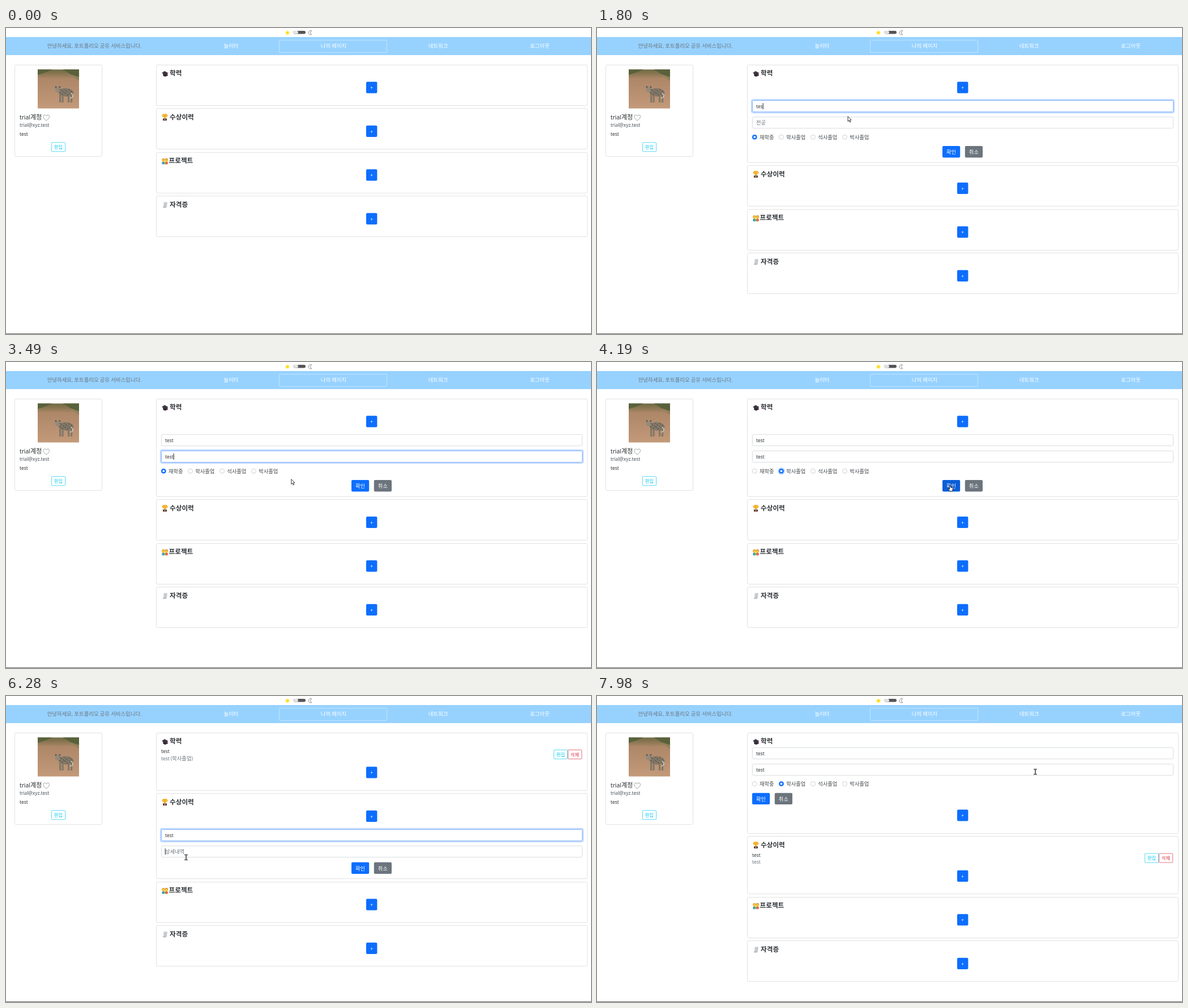
These frames come from a looping animation (1033 px wide and 542 px high, 8 s). An HTML page with a canvas:

```html
<!DOCTYPE html>
<html lang="ko">
<head>
<meta charset="utf-8">
<style>
html, body { margin: 0; width: 100%; height: 100%; overflow: hidden; background: #fff; }
canvas { display: block; }
</style>
</head>
<body>
<canvas id="stage" width="1033" height="542"></canvas>
<script>
const ctx = document.getElementById('stage').getContext('2d');
const FONT = '"Noto Sans", "Noto Sans CJK KR", "Noto Sans CJK JP", sans-serif';
const BLUE = '#0d6efd', DARK_BLUE = '#0b5ed7', GRAY = '#6c757d', INK = '#2c3034';
const CYAN = '#0dcaf0', RED = '#dc3545', GLOW = 'rgba(13,110,253,.25)';
const CARD_LINE = '#e2e2e2';
const LOOP = 8000, BODY = 8.3, SMALL = 7.3;

// [step, x, y]; one step is a tenth of a second
const CURSOR_PATH = [
  [2, 652, 9], [5, 645, 104], [8, 645, 104], [13, 440, 139], [16, 443, 141],
  [18, 443, 156.6], [20, 438, 167], [23, 446, 169], [27, 610.8, 221.5],
  [29, 622, 219], [32, 623, 218], [37, 325, 192], [38, 325, 192],
  [41, 618, 217], [42, 623.5, 218.5], [44, 623.5, 218.5], [47, 643, 211],
  [53, 643, 211], [57, 330, 247], [60, 322, 250], [62, 318, 280],
  [63, 318, 285.6], [67, 322, 284], [72, 623, 304], [74, 623, 304],
  [77, 979, 103], [78, 979, 103], [80, 774, 134]
];
const FOCUS = [
  [0, ''], [7, 'plus0'], [13, 'first'], [20, 'second'], [38, 'radio'], [43, 'ok'], [44, ''],
  [49, 'plus1'], [57, 'first'], [63, 'second'], [73, 'ok'], [74, '']
];

let step = 0, cursor = null, pointer = 'arrow';

function stepAt(t) {
  const drift = t < 3650 ? 0 : t < 5150 ? 10 : 20;
  return Math.floor((t + drift) / 100);
}

function cursorAt(s) {
  if (s < CURSOR_PATH[0][0]) return null;
  const i = CURSOR_PATH.findIndex(k => k[0] >= s);
  const b = CURSOR_PATH[i], a = CURSOR_PATH[Math.max(0, i - 1)];
  const p = b === a ? 0 : (s - a[0]) / (b[0] - a[0]);
  return { x: a[1] + (b[1] - a[1]) * p, y: a[2] + (b[2] - a[2]) * p };
}

const focusAt = s => FOCUS.filter(f => f[0] <= s).pop() || FOCUS[0];
const hasGlow = name => focusAt(step - 1)[1] === name;
const typed = start => 'test'.slice(0, Math.max(0, step - start + 1));

function hover(x, y, w, h, kind, inset = 0) {
  const hit = cursor && cursor.x >= x + inset && cursor.x <= x + w - inset &&
    cursor.y >= y + inset && cursor.y <= y + h - inset;
  if (hit) pointer = kind;
  return hit;
}

function shape(fill, points, stroke, width = 1) {
  ctx.beginPath();
  points.forEach(([x, y]) => ctx.lineTo(x, y));
  ctx.closePath();
  paint(fill, stroke, width);
}

function paint(fill, stroke, width = 1) {
  if (fill) { ctx.fillStyle = fill; ctx.fill(); }
  if (stroke) { ctx.strokeStyle = stroke; ctx.lineWidth = width; ctx.stroke(); }
}

function oval(x, y, rx, ry, fill, stroke, width) {
  ctx.beginPath();
  ctx.ellipse(x, y, rx, ry, 0, 0, Math.PI * 2);
  paint(fill, stroke, width);
}

function rect(x, y, w, h, fill) {
  ctx.fillStyle = fill;
  ctx.fillRect(x, y, w, h);
}

function rounded(x, y, w, h, r, fill, stroke, width) {
  ctx.beginPath();
  ctx.roundRect(x, y, w, h, r);
  paint(fill, stroke, width);
}

// Outline snapped to whole pixels.
function box(x, y, w, h, r, fill, stroke, width = 1) {
  rounded(Math.round(x) + .5, Math.round(y) + .5, Math.round(w) - 1, Math.round(h) - 1, r, fill, stroke, width);
}

function ring(x, y, w, h) {
  rounded(x - 1.1, y - 1.1, w + 2.2, h + 2.2, 3, null, GLOW, 2.2);
}

// Hangul is set slightly larger than Latin on the same baseline.
function text(str, x, y, size = BODY, color = INK, align = 'left', weight = 400) {
  const runs = str.match(/[가-힣]+|[^가-힣]+/g) || [];
  const setFont = run => {
    ctx.font = `${weight} ${/[가-힣]/.test(run) ? size * 1.12 : size}px ${FONT}`;
    return ctx.measureText(run).width;
  };
  const total = runs.reduce((sum, run) => sum + setFont(run), 0);
  let left = align === 'center' ? x - total / 2 : x;
  ctx.fillStyle = color;
  for (const run of runs) {
    const w = setFont(run);
    ctx.fillText(run, left, y + size * .4);
    left += w;
  }
  return total;
}

function button(label, x, y, w, color, hoverColor, name) {
  const h = 20.4;
  const over = hover(x, y, w, h, 'hand', 2);
  rounded(x, y, w, h, 2, over ? hoverColor : color);
  if (name && hasGlow(name)) ring(x, y, w, h);
  text(label, x + w / 2, y + h / 2 + .4, BODY, '#fff', 'center');
}

function outlineButton(label, x, y, color) {
  const over = hover(x, y, 25, 17, 'hand', 1);
  rounded(x + .4, y + .3, 24.3, 16, 1.5, over ? color : null, color, .7);
  text(label, x + 12.5, y + 8.5, SMALL, over ? '#fff' : color, 'center');
}

function field(y, value, hint, name) {
  const x = 274, w = 744, h = 21;
  hover(x, y, w, h, 'beam');
  const lit = name && hasGlow(name);
  box(x, y, w, h, 2, '#fff', lit ? '#86b7fe' : '#d9dde1');
  if (lit) ring(x, Math.round(y), w, h);
  const width = text(value || hint, 281, y + 10.7, BODY, value ? INK : GRAY);
  const [since, focused] = focusAt(step);
  if (name && focused === name) {
    const typing = value && value.length < 4;
    if (typing || (step - since) % 10 < 5) {
      rect(Math.round(281 + (value ? width : 0)) - .3, Math.round(y) + 5, 1, 11, '#222');
    }
  }
}

function radios(y, chosen, name) {
  ['재학중', '학사졸업', '석사졸업', '박사졸업'].forEach((label, i) => {
    const x = i ? 269.5 + i * 56 : 278.3;
    hover(x - 5, y - 5, 48, 10, 'hand');
    const on = i === chosen;
    if (on && name && hasGlow(name)) oval(x, y, 5.4, 5.4, null, GLOW, 2.2);
    oval(x, y, 4, 4, on ? BLUE : '#fff', on ? BLUE : '#c4c4c4', .8);
    if (on) oval(x, y, 1.9, 1.9, '#fff');
    text(label, x + 8.7, y, BODY, '#43484d');
  });
}

const icons = {
  cap(x, y) {
    shape('#2b2b33', [[x + 2, y], [x + 10, y], [x + 9.5, y + 4], [x + 6, y + 5.5], [x + 2.5, y + 4]]);
    shape('#3c3542', [[x, y - 1], [x + 5, y - 4.5], [x + 11.5, y - 1], [x + 6, y + 2]]);
    shape('#8b3f62', [[x + 9.5, y], [x + 10.5, y], [x + 11, y + 4], [x + 9, y + 4]]);
  },
  trophy(x, y) {
    oval(x + 5.5, y - 3, 4.4, 2.2, null, '#e8a317', 1.2);
    shape('#f5b327', [[x + 2, y - 6], [x + 9, y - 6], [x + 8.3, y - 1.5], [x + 6.3, y + 1], [x + 4.7, y + 1], [x + 2.7, y - 1.5]]);
    rect(x + 4.7, y, 1.6, 2, '#d18b12');
    rect(x + 2, y + 2, 7, 3.6, '#57352c');
    rect(x + 4, y + 3, 3, 1.4, '#c6a47e');
  },
  people(x, y) {
    for (const [dx, shirt, hair] of [[2.9, '#3aa0b8', '#e0a32c'], [8.3, '#e0683f', '#c98a35']]) {
      oval(x + dx, y - 2, 2.7, 3, hair);
      oval(x + dx, y - 1.4, 2.2, 2.5, '#fcc33c');
      rounded(x + dx - 2.6, y + 1.2, 5.2, 4.6, 1.5, shirt);
    }
    oval(x + 5.5, y + 3, 1.8, 1.5, '#8bb949');
  },
  scroll(x, y) {
    shape('#d2d4d6', [[x + 3.5, y - 5], [x + 10, y - 5], [x + 9, y + 4], [x + 3, y + 4]]);
    for (let i = 0; i < 3; i++) rect(x + 4.5, y - 3 + i * 2, 4, .7, '#aeb3b7');
    oval(x + 5, y + 4, 3.2, 1.2, '#b5b8ba');
  }
};

function saved(y, detail) {
  text('test', 274, y + 33.3);
  text(detail, 274, y + 46, BODY, GRAY);
  outlineButton('편집', 967, y + 30.7, CYAN);
  outlineButton('삭제', 992, y + 30.7, RED);
}

function formButtons(x, y, name) {
  button('확인', x, y, 31.2, BLUE, DARK_BLUE, name);
  button('취소', x + 39.8, y, 31.2, GRAY, '#5c636a');
}

function editForm(y) {
  field(y + 26.5, 'test');
  field(y + 55.5, 'test');
  radios(y + 91, 1);
  formButtons(274, y + 107.2);
}

// Draws one section and returns the top of the next one.
function section(y, { title, icon, titleX = 289, mode = 'empty', form, detail, plus }) {
  const above = { saved: 30, edit: 106 }[mode] || 0;
  const below = mode === 'form' ? form.extra : 0;
  box(265, y, 762, 73.4 + above + below, 2.5, null, CARD_LINE);
  icons[icon](275, y + 16.3);
  text(title, titleX, y + 15.6, 10.4, INK, 'left', 600);
  if (mode === 'saved') saved(y, detail);
  if (mode === 'edit') editForm(y);
  button('+', 636, y + above + 30.7, 19.4, BLUE, DARK_BLUE, plus);
  if (mode === 'form') {
    field(y + 63.7, form.values[0], form.hints[0], 'first');
    field(y + 92.7, form.values[1], form.hints[1], 'second');
    if (form.radios) radios(y + 128.7, step < 38 ? 0 : 1, 'radio');
    formButtons(610, y + form.extra + 43.6, 'ok');
  }
  return y + 77.5 + above + below;
}

function header() {
  for (let i = 0; i < 8; i++) {
    const a = i * Math.PI / 4;
    oval(497 + Math.cos(a) * 3.4, 8.3 + Math.sin(a) * 3.4, .7, .7, '#ffe34d');
  }
  oval(497, 8.3, 2.6, 2.6, '#ffdc18');
  rounded(507.5, 5, 21.5, 5.4, 2.7, '#555');
  rounded(507.5, 5, 8.5, 5.4, 2.7, '#e2e2e2');
  ctx.beginPath();
  ctx.arc(537.8, 8.3, 3.8, -1, 1, true);
  ctx.quadraticCurveTo(534.5, 8.3, 539.8, 5.1);
  paint('#fff', '#666', .7);

  rect(0, 16, 1033, 32, '#97d2ff');
  text('안녕하세요, 포트폴리오 공유 서비스입니다.', 156, 32, 8.4, GRAY, 'center');
  box(482, 21, 191, 23, 1.5, null, '#c3e4ff');
  [['놀이터', 397.5], ['나의 페이지', 578.5], ['네트워크', 763], ['로그아웃', 942.5]]
    .forEach(([label, x]) => text(label, x, 32, 8.4, '#fff', 'center'));
  rect(0, 541, 1033, 1, '#666');
}

function photo() {
  ctx.save();
  ctx.beginPath();
  ctx.rect(56, 73.5, 73, 69);
  ctx.clip();
  const ground = ctx.createLinearGradient(0, 73, 0, 143);
  ground.addColorStop(0, '#6d6a45');
  ground.addColorStop(.1, '#85744f');
  ground.addColorStop(.24, '#ad8768');
  ground.addColorStop(1, '#c39a7a');
  rect(56, 73, 73, 70, ground);
  shape('#59613b', [[56, 73], [82, 73], [72, 78], [56, 83]]);
  shape('#59613b', [[100, 73], [129, 73], [129, 87], [114, 82]]);
  shape('#8f8058', [[114, 82], [129, 87], [129, 94]]);

  const fur = '#847867';
  for (const x of [94, 98.5, 109, 114]) rect(x, 114, 3.2, 18, fur);
  ctx.beginPath();
  ctx.ellipse(106, 114, 13.5, 7.5, .08, 0, Math.PI * 2);
  paint(fur);
  oval(91.5, 109, 5, 5, '#958a79');
  oval(88, 104.5, 1.5, 1.7, '#625c55');
  oval(95, 104.5, 1.5, 1.7, '#625c55');
  for (let i = 0; i < 24; i++) {
    oval(95 + i * 7 % 23, 109 + i * 5 % 11, .8, .7, '#504c48');
  }
  ctx.beginPath();
  ctx.arc(114, 120, 4, -1.5, 1.8);
  paint(null, '#ddd7cc', 1.4);
  ctx.restore();
}

function profile() {
  box(15, 65, 155, 163, 2.5, null, CARD_LINE);
  photo();
  text('trial계정', 24, 158, 10.1, INK, 'left', 500);
  ctx.beginPath();
  ctx.moveTo(71.2, 164);
  ctx.bezierCurveTo(61, 157, 68, 150.5, 71.2, 156);
  ctx.bezierCurveTo(74.4, 150.5, 81.4, 157, 71.2, 164);
  paint(null, '#777', .7);
  text('trial@xyz.test', 24, 171.7, BODY, '#495057');
  text('test', 24, 187.4);
  outlineButton('편집', 80, 202.5, CYAN);
}

function drawCursor() {
  if (!cursor) return;
  ctx.save();
  ctx.translate(cursor.x, cursor.y);
  ctx.lineJoin = 'round';
  if (pointer === 'beam') {
    rect(-3, -5, 6, 1.3, '#444');
    rect(-3, 4, 6, 1.3, '#444');
    rect(-.8, -4, 1.6, 8.5, '#444');
  } else if (pointer === 'hand') {
    shape('#fff', [[-.8, 0], [.8, 0], [1, 3.6], [4.5, 4.4], [5, 5.2], [4.6, 8.2],
      [3.8, 10.4], [-.3, 10.4], [-3.2, 6.8], [-2.6, 5.8], [-1, 7]], '#111', .9);
  } else {
    shape('#fff', [[0, 0], [0, 8.8], [2, 7], [3.5, 10.3], [4.9, 9.6], [3.4, 6.5], [6.2, 6.3]], '#222', .9);
  }
  ctx.restore();
}

function draw(now) {
  step = stepAt(now % LOOP);
  cursor = cursorAt(step);
  pointer = 'arrow';
  rect(0, 0, 1033, 542, '#fff');
  header();
  profile();

  let y = section(64.5, {
    title: '학력', icon: 'cap', plus: 'plus0', detail: 'test (학사졸업)',
    mode: step < 8 ? 'empty' : step < 44 ? 'form' : step < 78 ? 'saved' : 'edit',
    form: { extra: 101, radios: true, hints: ['학교 이름', '전공'], values: [typed(16), typed(25)] }
  });
  y = section(y, {
    title: '수상이력', icon: 'trophy', plus: 'plus1', detail: 'test',
    mode: step < 50 ? 'empty' : step < 74 ? 'form' : 'saved',
    form: { extra: 79, hints: ['수상내역', '상세내역'], values: [typed(59), typed(66)] }
  });
  y = section(y, { title: '프로젝트', icon: 'people', titleX: 287.5 });
  section(y, { title: '자격증', icon: 'scroll' });
  drawCursor();
  requestAnimationFrame(draw);
}
requestAnimationFrame(draw);
</script>
</body>
</html>
```
